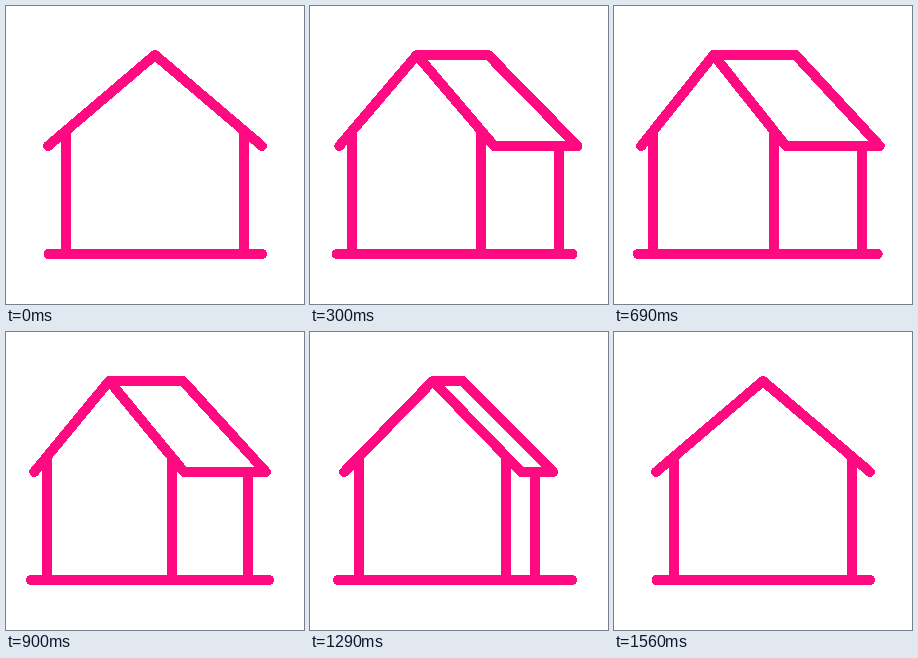
An HTML page for the animation above (1800 ms loop, 298 by 298 pixels).

```html
<!DOCTYPE html>
<html lang="en">
<head>
<meta charset="utf-8">
<title>Turning house</title>
<style>
  html, body { margin: 0; width: 100%; height: 100%; overflow: hidden; background: #fff; }
  svg { display: block; width: 100%; height: 100%; }
  path { fill: none; stroke: #ff0a80; stroke-width: 10; stroke-linejoin: round; shape-rendering: crispEdges; }
  #roof { stroke-linecap: round; }
</style>
</head>
<body>
<svg viewBox="0 0 298 298"><path id="walls"/><path id="roof"/></svg>
<script>
const LOOP = 1800, STEP = 30;
const OPENED = 420, DRIFTED = 1080, CLOSED = 1560;
const RIDGE = 49, EAVE = 140, GROUND = 248, WALL_TOP = 126;
const CENTER = 149, HALF = 107, OVERHANG = 18;

const mix = (a, b, u) => a + (b - a) * u;
const progress = (t, from, to) => Math.min(1, (t - from) / (to - from));
const easeInOut = u => (1 - Math.cos(Math.PI * u)) / 2;

// Opens from 0 to peak, drifts slowly to rest, then closes; delay above 1 closes later
function turn(t, peak, rest, delay) {
  if (t < OPENED) return peak * easeInOut(t / OPENED);
  if (t < DRIFTED) return mix(peak, rest, progress(t, OPENED, DRIFTED) ** 1.5);
  return mix(rest, 0, easeInOut(progress(t, DRIFTED, CLOSED) ** delay));
}

const walls = document.getElementById('walls');
const roof = document.getElementById('roof');

function draw(now) {
  const t = Math.floor(now % LOOP / STEP) * STEP;
  const shift = turn(t, 52, 42, 1.05);
  const ridgeDepth = turn(t, 88, 65, 0.78);
  const eaveDepth = turn(t, 102.5, 69, 0.78);
  const spread = turn(t, 1, 0.85, 1.8);

  // The gable narrows as it turns away
  const ridge = CENTER - shift;
  const half = HALF - 0.7 * shift;
  const wallHalf = half * (1 - OVERHANG / HALF);
  const backEave = ridge + half + eaveDepth;

  const wall = (x, top) => `M${x} ${top}V${GROUND}`;
  walls.setAttribute('d',
    wall(ridge - wallHalf, WALL_TOP) +
    wall(ridge + wallHalf, WALL_TOP) +
    wall(backEave - OVERHANG, EAVE));
  roof.setAttribute('d',
    `M${ridge - half} ${EAVE}L${ridge} ${RIDGE}L${ridge + half} ${EAVE}` +
    `H${backEave}L${ridge + ridgeDepth} ${RIDGE}H${ridge}` +
    `M${42.5 - 19.5 * spread} ${GROUND}H${256 + 8 * spread}`);
}

const start = performance.now();
function tick() {
  draw(performance.now() - start);
  requestAnimationFrame(tick);
}
tick();
</script>
</body>
</html>
```
